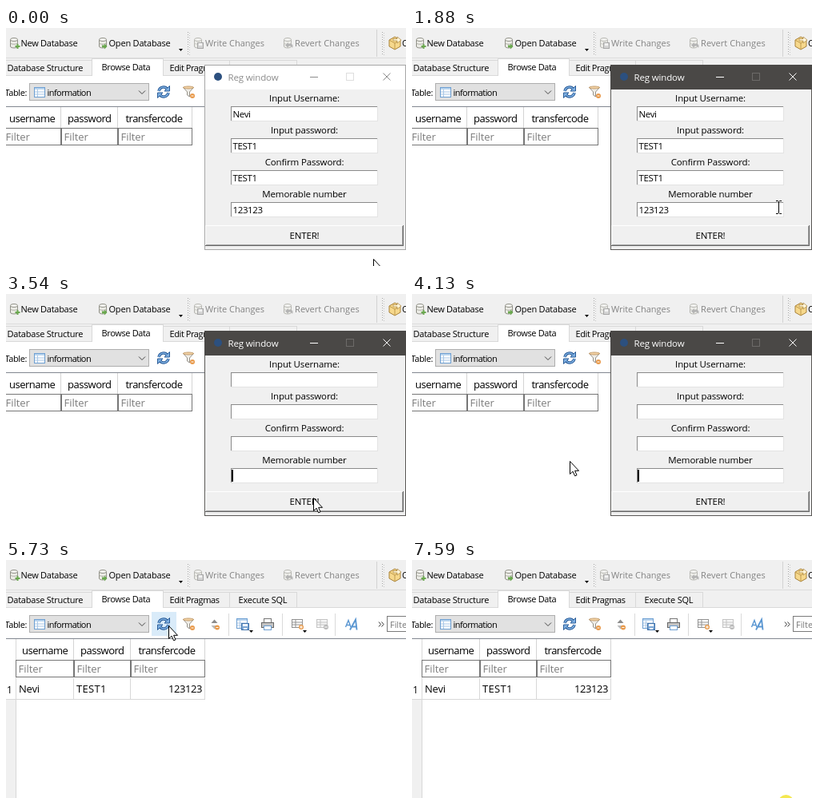
Write an HTML page that moves like this. It is 500 by 298 pixels and loops after 7650 ms.

```html
<!DOCTYPE html>
<html lang="en">
<head>
<meta charset="utf-8">
<title>Registration demo</title>
<style>
  html, body { margin: 0; width: 100%; height: 100%; overflow: hidden; background: #fff; }
  svg { display: block; }
  text { font-family: "Open Sans", "Noto Sans", sans-serif; font-size: 11px; fill: #000; white-space: pre; }
  rect { shape-rendering: crispEdges; }
  .off text { fill: #838383; }
  .grid text { font-size: 13px; letter-spacing: -.5px; }
  .grid .hint, .hint { font-size: 13px; letter-spacing: -.05px; fill: #7c7c7c; }
  .win text { font-size: 11.5px; letter-spacing: -.15px; }
  .win .label { text-anchor: middle; }
  .win .value text { letter-spacing: -.38px; }
  .win .idle text { fill: #8c8c8c; }
  .win .live text { fill: #fff; }
  .line { fill: none; stroke-width: 1; }
</style>
</head>
<body>
<svg id="stage" width="500" height="298" viewBox="0 0 500 298">
  <defs>
    <g id="db">
      <path d="M.5 2.5V11c0 2.6 9 2.6 9 0V2.5" fill="#ecece6" stroke="#8d8d84"/>
      <ellipse cx="5" cy="2.5" rx="4.5" ry="2" fill="#f8f8f4" stroke="#8d8d84"/>
      <path d="M.5 6.5c0 2.4 9 2.4 9 0" fill="none" stroke="#b0b0a8"/>
    </g>
    <g id="sheet">
      <rect x=".5" y=".5" width="13" height="12" fill="#fff" stroke="#6d9fd2"/>
      <rect x="1" y="1" width="12" height="2" fill="#b9d4ee"/>
      <path d="M4.5 3v9M1 6h12M1 9h12" stroke="#a9c7e6"/>
    </g>
    <path id="drop" d="M0 0h5L2.5 3z"/>
    <g id="grip">
      <path d="M.5 0v28" stroke="#a8a8a8" stroke-dasharray="1 2"/>
      <path d="M2.5 1v28" stroke="#c8c8c8" stroke-dasharray="1 2"/>
    </g>
    <path id="arcs" d="M191 79c1-5.500 8-6.500 10.500-2.500M203 81c-1 5.500-8 6.500-10.500 2.500" fill="none"/>
  </defs>

  <rect width="500" height="298" fill="#fff"/>

  <!-- main toolbar -->
  <rect width="500" height="60" fill="#f0f0f0"/>
  <rect y="37" width="500" height="1" fill="#dcdcdc"/>
  <use href="#db" x="5" y="12"/>
  <path d="M14.500 20v6M11.500 23h6" stroke="#6aa84f" stroke-width="2"/>
  <text x="18.5" y="23" letter-spacing="-.27">New Database</text>
  <use href="#db" x="116" y="12"/>
  <path d="M120 24.500v-3h3V19.500l3.500 3.500-3.500 3.500v-2z" fill="#6aa84f"/>
  <text x="128.500" y="23" letter-spacing="-.2">Open Database</text>
  <use href="#drop" x="216" y="26"/>
  <use href="#grip" x="227" y="5"/>
  <g class="off">
    <use href="#db" x="235" y="12" opacity=".6"/>
    <rect x="239.500" y="18.500" width="7" height="7" fill="#d4d4d4" stroke="#a6a6a6"/>
    <rect x="241" y="19" width="4" height="3" fill="#f2f2f2"/>
    <text x="249" y="23" letter-spacing="-.03">Write Changes</text>
    <use href="#db" x="347" y="12" opacity=".6"/>
    <path d="M358 25c2-5-2-6-5-5v-2l-4 3.500 4 3.500v-2c3-1 4 0 5 2" fill="#b4b4b4"/>
    <text x="361" y="23" letter-spacing=".08">Revert Changes</text>
  </g>
  <rect x="463" y="2" width="1" height="34" fill="#d2d2d2"/>
  <use href="#grip" x="470" y="5"/>
  <path d="M479 15l7-4 7 4v8l-7 4-7-4z" fill="#f6d88c" stroke="#a8823a"/>
  <path d="M479 15l7 4 7-4M486 19v8" fill="none" stroke="#c09a4c"/>
  <path d="M484 16v-2.500h5v-2.500l5 4-5 4v-3z" fill="#fff6da" stroke="#a8823a" stroke-width=".7"/>
  <text x="495" y="23">O</text>

  <!-- tabs -->
  <rect y="59" width="500" height="1" fill="#d9d9d9"/>
  <g fill="#f0f0f0" stroke="#d9d9d9" shape-rendering="crispEdges">
    <path d="M-1 59V40.500H108V59M196 59V40.500H279.500V59M279.500 40.500H363.500V59"/>
    <path d="M107.500 60V38.500H196.500V60" fill="#fff"/>
  </g>
  <text x="1.500" y="54" letter-spacing="-.22">Database Structure</text>
  <text x="119.500" y="53" letter-spacing="-.36">Browse Data</text>
  <text x="204.500" y="54" letter-spacing="-.42">Edit Pragmas</text>
  <text x="290.500" y="54" letter-spacing="-.2">Execute SQL</text>

  <!-- table toolbar -->
  <text x="-1.500" y="85" letter-spacing="-.42">Table:</text>
  <rect x="29" y="69" width="150" height="22" fill="#adadad"/>
  <rect x="30" y="70" width="148" height="20" fill="#e1e1e1"/>
  <use href="#sheet" x="35" y="74"/>
  <text x="51.500" y="85" letter-spacing="-.56">information</text>
  <path d="M166 78.500l4 4 4-4" class="line" stroke="#444"/>
  <rect id="refresh" x="182" y="65" width="31" height="30"/>
  <rect id="clear" x="214" y="65" width="30" height="30"/>
  <use href="#arcs" stroke="#2a5c98" stroke-width="3.400"/>
  <path d="M204.500 72.500v6.500h-6.500zM189.500 87.500v-6.500h6.500z" fill="#7fb0e2" stroke="#2a5c98"/>
  <use href="#arcs" stroke="#7fb0e2" stroke-width="1.400"/>
  <path d="M221.500 74.500h13l-5 5.500v6l-3-2v-4z" fill="#efede8" stroke="#96928a"/>
  <ellipse cx="228" cy="74.500" rx="6.500" ry="1.500" fill="#f3d3a6" stroke="#b58a52" stroke-width=".8"/>
  <circle cx="233" cy="85" r="3" fill="#e8994a"/>
  <path d="M231.500 85h3" stroke="#fff"/>
  <path d="M260.500 74.500l4 4.500h-8z" fill="#8b8b8b"/>
  <path d="M256.500 82h8l-4 4.500z" fill="#b9b9b9"/>
  <circle cx="264" cy="84.500" r="3" fill="#e8994a"/>
  <path d="M262.500 84.500h3" stroke="#fff"/>
  <g fill="#dadada">
    <rect x="278" y="67" width="1" height="28"/>
    <rect x="345" y="67" width="1" height="28"/>
    <rect x="411" y="67" width="1" height="28"/>
  </g>
  <use href="#sheet" x="288" y="73"/>
  <rect x="294.500" y="79.500" width="9" height="8" fill="#7fa9d6" stroke="#3c70aa"/>
  <rect x="296" y="80" width="6" height="3" fill="#f0f5fb"/>
  <rect x="297" y="85" width="4" height="2" fill="#fff"/>
  <use href="#drop" x="304" y="88"/>
  <rect x="322.500" y="73.500" width="9" height="6" fill="#fff" stroke="#777"/>
  <rect x="319.500" y="78.500" width="15" height="6" fill="#c4c4c4" stroke="#666"/>
  <rect x="322.500" y="82.500" width="9" height="5" fill="#fff" stroke="#6d9fd2"/>
  <g fill="#fff" stroke="#929292">
    <rect x="357.500" y="74.500" width="13" height="10"/>
    <path d="M357 78h14M357 81h14M362 74v11"/>
    <circle cx="369" cy="84" r="3" fill="#e8994a" stroke="none"/>
    <path d="M367 84h4M369 82v4" stroke="#fff"/>
  </g>
  <use href="#drop" x="371" y="88"/>
  <g fill="#f6f6f6" stroke="#c4c4c4">
    <rect x="388.500" y="74.500" width="13" height="10"/>
    <path d="M388 78h14M388 81h14M393 74v11"/>
    <circle cx="400" cy="84" r="3" fill="#b8b8b8" stroke="none"/>
    <path d="M398 84h4" stroke="#fff"/>
  </g>
  <g fill="none" stroke="#5b97d2">
    <path d="M424.500 84l3.500-8.500 3 8.500M426 81.500h4" stroke-width="1.400"/>
    <path d="M430 87.500l7-13 1.500 13M432.500 83.500h5.500" stroke-width="1.900"/>
  </g>
  <path d="M466 77.500l2.500 3-2.500 3M469.500 77.500l2.500 3-2.500 3" class="line" stroke="#333"/>
  <rect x="476.500" y="70.500" width="30" height="19" fill="#fff" stroke="#7a7a7a"/>
  <text x="480" y="85" class="hint" style="font-size:11px">Filter</text>
  <rect y="98" width="500" height="1" fill="#828790"/>

  <!-- data grid -->
  <g class="grid">
    <g id="cols"></g>
    <g id="row">
      <rect y="99" width="12" height="75" fill="#fff"/>
      <rect y="175" width="12" height="123" fill="#f0f0f0"/>
      <g fill="#d8d8d8">
        <rect x="12" y="99" width="1" height="26"/>
        <rect x="12" y="147" width="1" height="151"/>
        <rect y="174" width="249" height="1"/>
        <rect x="84" y="148" width="1" height="26"/>
        <rect x="155" y="148" width="1" height="26"/>
        <rect x="248" y="148" width="1" height="26"/>
      </g>
      <text x="1" y="167" style="font-size:12px">1</text>
      <text x="16" y="166" style="letter-spacing:-.2px">Nevi</text>
      <text x="88" y="166" style="letter-spacing:.3px">TEST1</text>
      <text x="203" y="166" style="letter-spacing:-.45px">123123</text>
    </g>
  </g>

  <!-- dialog -->
  <g id="win" class="win">
    <rect x="248" y="46" width="252" height="232" fill="#a6a6a6"/>
    <rect x="249" y="47" width="250" height="230" fill="#f0f0f0"/>
    <g class="idle">
      <rect x="249" y="47" width="250" height="30" fill="#fff"/>
      <text x="277.500" y="66">Reg window</text>
      <path d="M380 61.500h10M471.500 56.500l9 9m0-9l-9 9" class="line" stroke="#8c8c8c"/>
      <rect x="425.500" y="56.500" width="9" height="9" class="line" stroke="#dedede"/>
    </g>
    <g class="live" id="live">
      <rect x="248.500" y="46.500" width="251" height="231" class="line" stroke="#5a5856"/>
      <rect x="248" y="46" width="252" height="31" fill="#4a4846"/>
      <text x="277.500" y="66">Reg window</text>
      <path d="M380 61.500h10M471.500 56.500l9 9m0-9l-9 9" class="line" stroke="#fff"/>
      <rect x="425.500" y="56.500" width="9" height="9" class="line" stroke="#6c6a68"/>
    </g>
    <circle cx="265" cy="61" r="5" fill="#2c507f"/>
    <g id="fields"></g>
    <rect id="caret" y="220" width="2" height="15"/>
    <g id="raised">
      <rect x="249" y="247" width="248" height="26" fill="#696969"/>
      <rect x="249" y="247" width="247" height="25" fill="#fff"/>
      <rect x="250" y="248" width="246" height="24" fill="#a0a0a0"/>
      <rect x="250" y="248" width="245" height="23" fill="#f0f0f0"/>
    </g>
    <g id="sunken">
      <rect x="249" y="247" width="248" height="26" fill="#fff"/>
      <rect x="249" y="247" width="247" height="25" fill="#696969"/>
      <rect x="250" y="248" width="246" height="24" fill="#e3e3e3"/>
      <rect x="251" y="249" width="245" height="23" fill="#f0f0f0"/>
    </g>
    <text id="enter" class="label" x="373" y="264">ENTER!</text>
  </g>

  <circle id="spot" cx="467.500" cy="303.500" r="9.500" fill="#f4e850"/>
  <g id="pointer">
    <path id="arrow" d="M.5.5v16l3.600-3.300 2.500 5.600 2.400-1-2.400-5.500h4.900z" fill="#fff" stroke="#000"/>
    <path id="beam" d="M-3-7.500h2.500l1 1 1-1H4M.5-6.500v14M-3 8.500h2.500l1-1 1 1H4" fill="none" stroke="#000"/>
  </g>
</svg>
<script>
const LOOP = 7650;
const $ = id => document.getElementById(id);
const show = (id, on) => $(id).setAttribute('display', on ? 'inline' : 'none');
const within = (v, a, b) => v >= a && v < b;

// grid columns: name, left, right, text x
const columns = [['username', -4, 68, 4], ['password', 69, 139, 77], ['transfercode', 140, 232, 149.5]];
$('cols').innerHTML = columns.map(([name, l, r, x], i) => `
  <rect id="head${i}" x="${l}" y="99" width="${r - l}" height="26"/>
  <rect x="${r}" y="99" width="1" height="26" fill="#d4d4d4"/>
  <text x="${x}" y="118">${name}</text>
  <rect x="${l + .5}" y="125.500" width="${r - l}" height="21" fill="#fff" stroke="#767676"/>
  <text class="hint" x="${l + 3.5}" y="141">Filter</text>`).join('');

const inputs = [['Input Username:', 'Nevi'], ['Input password:', 'TEST1'],
  ['Confirm Password:', 'TEST1'], ['Memorable number', '123123']];
const fieldTop = i => 98 + 40 * i;
$('fields').innerHTML = inputs.map(([label], i) => {
  const y = fieldTop(i);
  return `<text class="label" x="373" y="${y - 6}">${label}</text>
    <rect x="281" y="${y}" width="184" height="19" fill="#e3e3e3"/>
    <rect x="281" y="${y}" width="183" height="18" fill="#8a8a8a"/>
    <rect x="282" y="${y + 1}" width="182" height="17" fill="#fff"/>`;
}).join('') + '<g id="values" class="value">' + inputs.map(([, value], i) =>
  `<text x="283.500" y="${fieldTop(i) + 14}">${value}</text>`).join('') + '</g>';

// pointer path: time, x, y
const path = [
  [0, 459, 289], [20, 459, 289], [730, 475, 178], [1490, 475, 178],
  [1880, 458, 224], [2010, 455, 227], [2280, 406, 259], [2440, 406, 259],
  [2450, 405, 259], [3520, 405, 259], [3540, 384, 255], [4200, 193, 208],
  [4300, 193, 208], [4520, 184, 152], [4750, 212, 98], [5060, 222, 85],
  [5070, 222, 85], [5290, 203, 82], [6470, 203, 82], [7250, 440, 300], [LOOP, 440, 300]
];

const rests = (a, b) => a[1] === b[1] && a[2] === b[2];

function slope(i, k) {
  const a = path[i - 1], p = path[i], b = path[i + 1];
  if (!a || !b || rests(a, p) || rests(p, b)) return 0;
  return (b[k] - a[k]) / (b[0] - a[0]);
}

function pointerAt(t) {
  let i = 0;
  while (i < path.length - 2 && t >= path[i + 1][0]) i++;
  const a = path[i], b = path[i + 1], d = b[0] - a[0], u = (t - a[0]) / d;
  const s = u * u * (3 - 2 * u);
  return [1, 2].map(k => Math.round(a[k] + (b[k] - a[k]) * s +
    d * u * (1 - u) * ((1 - u) * slope(i, k) - u * slope(i + 1, k))));
}

function draw(t) {
  const [x, y] = pointerAt(t);
  const open = t < 4230, loaded = t >= 5630;
  const shift = loaded ? 16 : 0;
  const pressed = within(t, 2710, 2970);

  show('win', open);
  $('live').setAttribute('opacity', t < 1020 ? 0 : t < 1080 ? .35 : t < 1140 ? .7 : 1);
  show('values', t < 2970);
  show('raised', !pressed);
  show('sunken', pressed);
  $('enter').setAttribute('transform', pressed ? 'translate(1 1)' : '');
  show('caret', within(t, 2010, 2610) || within(t, 2970, 3570) || within(t, 3870, 4230));
  $('caret').setAttribute('x', t < 2970 ? 318 : 282);

  show('row', loaded);
  $('cols').setAttribute('transform', `translate(${shift} 0)`);
  columns.forEach(([, l, r], i) => {
    const over = !open && within(y, 98, 125) && within(x - shift, l, r + 1);
    $('head' + i).setAttribute('fill', over ? '#d9ebf9' : '#fff');
  });
  const onBar = !open && within(y, 65, 95);
  const hot = within(t, 5530, 5700) ? '#c4e0f5' : '#d9ebf9';
  $('refresh').setAttribute('fill', onBar && within(x, 182, 214) ? hot : '#fff');
  $('clear').setAttribute('fill', onBar && within(x, 214, 244) ? hot : '#fff');

  const typing = open && within(x, 282, 464) &&
    inputs.some((_, i) => within(y, fieldTop(i), fieldTop(i) + 19));
  show('arrow', !typing);
  show('beam', typing);
  $('pointer').setAttribute('transform', `translate(${x} ${y})`);
  show('pointer', t < 7250);
  show('spot', t >= 7590);
}

const start = performance.now();
function tick() {
  draw((performance.now() - start) % LOOP);
  requestAnimationFrame(tick);
}
tick();
</script>
</body>
</html>
```
